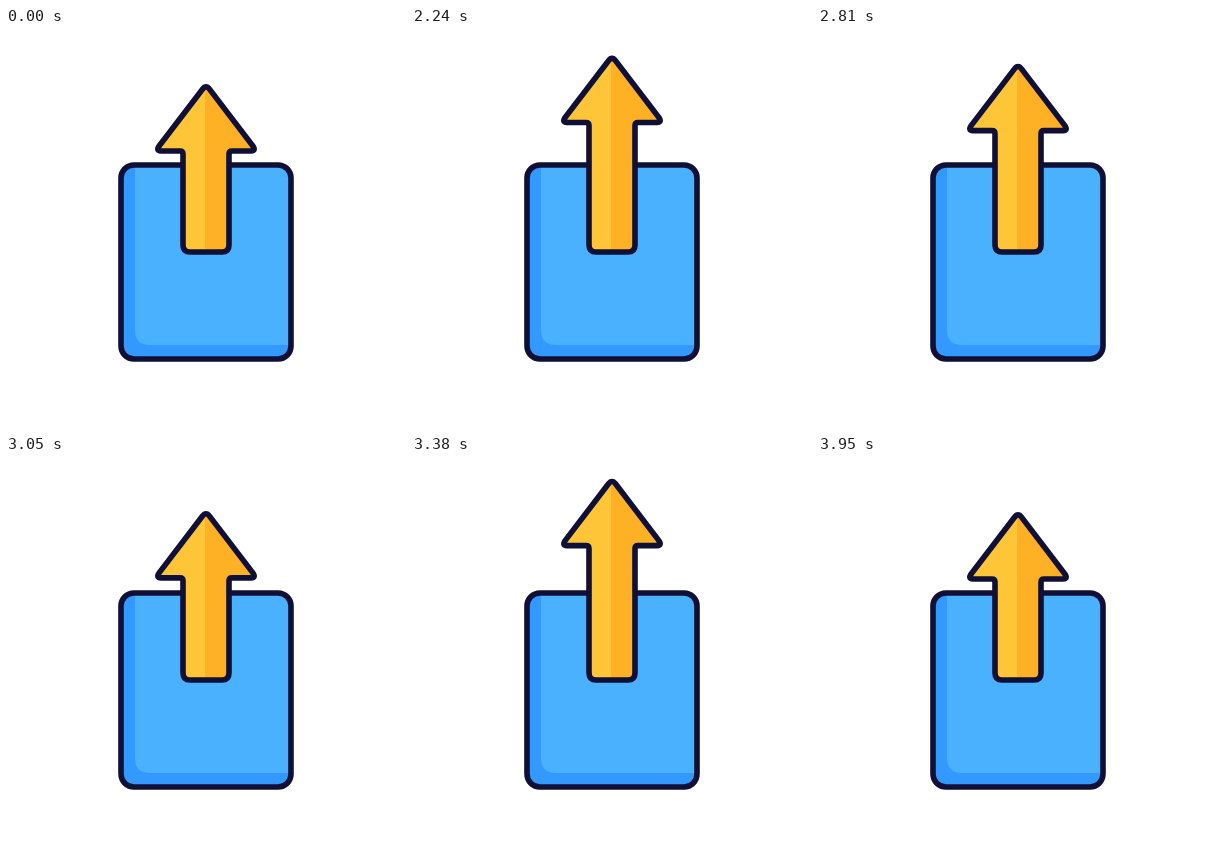
These frames come from a looping animation (400x400 px, 4.04 s). An HTML page:

```html
<!DOCTYPE html>
<html lang="en">
<head>
<meta charset="utf-8">
<title>Upload</title>
<style>
  html, body { margin: 0; width: 100%; height: 100%; overflow: hidden; background: #fff; }
  svg { display: block; width: 100vw; height: 100vh; }
  .line { stroke: #100f35; stroke-width: 5.6; stroke-linejoin: round; }
</style>
</head>
<body>
<svg viewBox="0 0 400 400">
  <defs>
    <linearGradient id="gold" gradientUnits="userSpaceOnUse" x1="199" y1="0" x2="200" y2="0">
      <stop offset=".5" stop-color="#ffc538"/>
      <stop offset=".5" stop-color="#ffb125"/>
    </linearGradient>
    <clipPath id="card"><rect x="115" y="137" width="170" height="194" rx="13"/></clipPath>
  </defs>
  <g clip-path="url(#card)">
    <rect x="115" y="137" width="170" height="194" fill="#3399ff"/>
    <path d="M129 137H285V317H144Q129 317 129 302Z" fill="#4ab1ff"/>
  </g>
  <rect class="line" x="115" y="137" width="170" height="194" rx="13" fill="none"/>
  <path id="arrow" class="line" fill="url(#gold)"/>
</svg>
<script>
const LOOP = 4040, START = 2030, STEP = 30, REACH = 34;

// time in ms, height from 0 to 1
const keys = [
  [2012, 0], [2190, 1], [2380, 0], [2655, 1],
  [3010, 0], [3350, 1], [3710, 0]
];

const ease = u => (1 - Math.cos(Math.PI * u)) / 2;

function height(t) {
  if (t < START) return 0;
  t = START + Math.floor((t - START) / STEP) * STEP;
  for (let i = 1; i < keys.length; i++) {
    const [t0, a] = keys[i - 1], [t1, b] = keys[i];
    if (t < t1) return a + (b - a) * ease((t - t0) / (t1 - t0));
  }
  return 0;
}

// The head moves by dy while the foot of the stem stays put.
function arrowPath(dy) {
  const y = v => (v + dy).toFixed(2);
  return `M177 ${y(126)}Q177 ${y(123)} 174 ${y(123)}H155` +
    `Q149.5 ${y(123)} 153.5 ${y(117.5)}L196.5 ${y(61.2)}` +
    `Q200 ${y(56.5)} 203.5 ${y(61.2)}L246.5 ${y(117.5)}` +
    `Q250.5 ${y(123)} 245 ${y(123)}H226Q223 ${y(123)} 223 ${y(126)}` +
    `V217Q223 224 216 224H184Q177 224 177 217Z`;
}

const arrow = document.getElementById("arrow");
const begin = performance.now();

function draw() {
  const t = (performance.now() - begin) % LOOP;
  arrow.setAttribute("d", arrowPath(-REACH * height(t)));
  requestAnimationFrame(draw);
}
draw();
</script>
</body>
</html>
```
